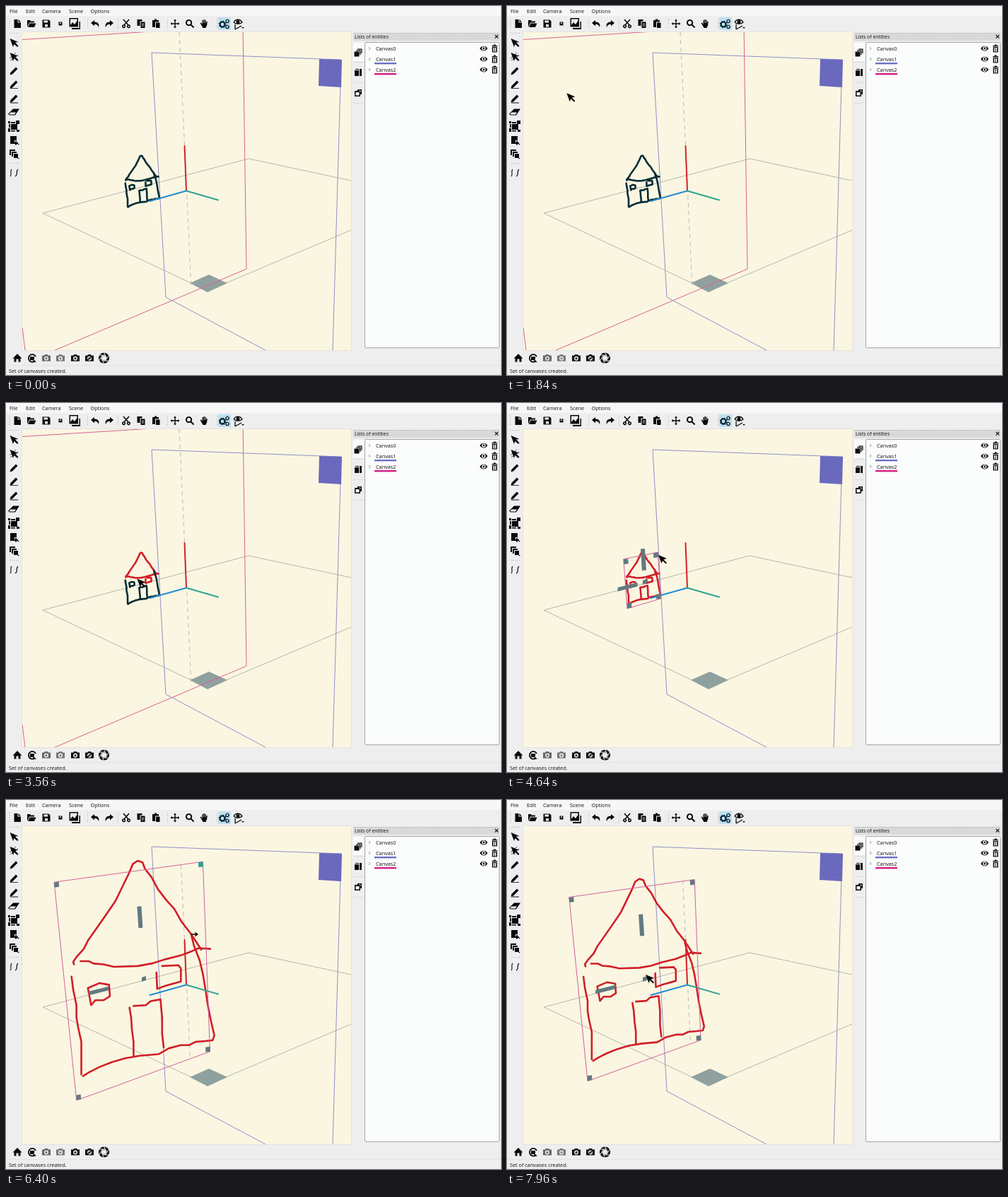
These frames come from a looping animation (700 by 522 pixels, 8000 ms). An HTML page:

```html
<!DOCTYPE html>
<html lang="en">
<head>
<meta charset="utf-8">
<title>Canvas scaling</title>
<style>
html, body { margin: 0; width: 100%; height: 100%; overflow: hidden; background: #eee; }
svg { display: block; width: 700px; height: 522px; }
text { font: 7.3px "Open Sans", "Noto Sans", sans-serif; fill: #111; }
.line { fill: none; stroke-width: 1; }
.pink { stroke: #dc6090; }
.violet { stroke: #8f90c8; }
.grey { stroke: #b5b6ae; }
.axis { stroke-width: 2; stroke-linecap: round; }
#house path { fill: none; stroke-width: 2.6; stroke-linejoin: round; stroke-linecap: round; vector-effect: non-scaling-stroke; }
#gizmo path { fill: #617a80; }
</style>
</head>
<body>
<svg viewBox="0 0 700 522">
  <defs>
    <clipPath id="view"><rect x="23" y="37" width="465" height="450"/></clipPath>
    <clipPath id="inner"><polygon id="hole"/></clipPath>
  </defs>
  <rect width="700" height="522" fill="#eee"/>
  <rect y="0" width="700" height="14" fill="#f7f7f7"/>
  <rect x="22.5" y="36.5" width="466" height="451" fill="#faf6e1" stroke="#e4e3dc"/>

  <g clip-path="url(#view)">
    <path class="line grey" d="M488 247L343 216L52 293L285 403L488 317"/>
    <path d="M260 392L287 380L313 392L285 405Z" fill="#8fa19e"/>
    <g clip-path="url(#inner)"><path class="line" stroke="#bbb9bf" stroke-dasharray="6 5" d="M245 37L262 400"/></g>
    <g id="sheet" class="line pink"><path d="M23 47.5L335 28L340 372L69 487M23 455L27 487"/></g>
    <path class="line violet" d="M367 487L226 412L206 66L474 76L462 487"/>
    <path d="M443 75L475 76L474 115L442 113Z" fill="#6a69bd"/>
    <g id="house"></g>
    <path class="axis" stroke="#d3222b" d="M255 261.500L252.500 198"/>
    <path class="axis" stroke="#268bd2" d="M255 261.500L203.500 276"/>
    <path class="axis" stroke="#2fa592" d="M255 261.500L300 274.500"/>
    <g id="gizmo"></g>
  </g>

  <g id="menu"></g>
  <rect x="300" y="16" width="18" height="18" fill="#bfe0ee"/>
  <rect id="hover" x="1.500" y="42.500" width="20" height="18" fill="#cbe6f1"/>
  <path d="M5 18V33M115.500 18V33M228.500 18V33M298.500 18V33M5 38.500H19M5 222.500H19" stroke="#aaa" stroke-dasharray="1 2"/>
  <path d="M158.500 18V33" stroke="#d6d6d6"/>

  <rect x="491" y="38" width="207" height="11" fill="#d9d9d9"/>
  <path d="M491 38.500H698" stroke="#bbb" stroke-dasharray="2 1"/>
  <text x="493" y="46" style="font-size:6.900px">Lists of entities</text>
  <path d="M691.500 41L696 45.500M696 41L691.500 45.500" stroke="#222" stroke-width="1.200"/>
  <rect x="507.500" y="51.500" width="190" height="432" rx="1" fill="#fbfdfc" stroke="#a5a5a5"/>
  <rect x="491" y="52" width="16" height="26" fill="#fafafa"/>
  <path d="M491 79.500H506M491 108.500H506M491 137.500H506" stroke="#dcdcdc"/>
  <g id="rows"></g>
  <g id="icons"></g>
  <path d="M0 508.500H700" stroke="#e2e2e2"/>
  <text x="4" y="518.500">Set of canvases created.</text>

  <g id="sys"><path d="M0 0V12L3 9.500L5 14L7 13L5 8.800H9Z" fill="#fff" stroke="#111" stroke-width=".9"/></g>
  <g id="pick"><path d="M0 0L12 5L7.500 6.500L12 11L10.500 12.500L6 8L4.500 12Z" fill="#050505"/></g>
  <g id="drag"><path d="M-5 0H3" stroke="#111" stroke-width="1.600"/><path d="M1.500-3.500L6 0L1.500 3.500Z" fill="#111"/></g>
</svg>
<script>
const $ = id => document.getElementById(id);

function add(parent, tag, attrs, text) {
  const el = document.createElementNS('http://www.w3.org/2000/svg', tag);
  for (const a in attrs) el.setAttribute(a, attrs[a]);
  if (text) el.textContent = text;
  return parent.appendChild(el);
}

// Icons: f = filled path, s = stroked path, w = stroke width
const CAMERA = 'M-6-3.5H-3L-2-5H2L3-3.5H6V4.500H-6ZM0-2.500A3 3 0 1 0 0 3.500A3 3 0 1 0 0-2.500ZM0-1A1.500 1.500 0 1 1 0 2A1.500 1.500 0 1 1 0-1Z';
const POINTER = 'M-5.500-6L6.500-1L2-.5L6.500 4.500L5 6L.5 2L-1 6Z';
const UNDO = 'M-6-1L-1-5V-2.500C4-2.500 6.500 1 5 5C4 2 2 .8-1 .8V3.500Z';
const PEN = 'M-5.500 5.500L-4.500 2L3-5.500L5.500-3L-2 4.500Z';
const EYE = 'M-5.500 0C-3-4.500 3-4.500 5.500 0C3 4.500-3 4.500-5.500 0ZM0-2.700A2.700 2.700 0 1 0 0 2.700A2.700 2.700 0 1 0 0-2.700ZM0-1.400A1.400 1.400 0 1 1 0 1.400A1.400 1.400 0 1 1 0-1.400Z';
const TRASH = 'M-4-4H-1.500V-5.500H1.500V-4H4V-2.800H-4ZM-3.500-2H3.500V5.500H-3.500ZM-2-1V4.500H-1V-1ZM-.5-1V4.500H.5V-1ZM1-1V4.500H2V-1Z';
const LAYERS = 'M-5.500-1.500H1.500V5.500H-5.500ZM-3-3.500H3.500V3H2.200V-2.300H-3ZM-1-5.500H5.500V1H4.300V-4.300H-1Z';

function icon(x, y, { f, s, w = 1.4, c = '#0a0a0a', flip }) {
  const g = add($('icons'), 'g', { transform: `translate(${x} ${y})${flip ? ' scale(-1 1)' : ''}` });
  if (f) add(g, 'path', { d: f, fill: c, 'fill-rule': 'evenodd' });
  if (s) add(g, 'path', { d: s, fill: 'none', stroke: c, 'stroke-width': w });
}

const top_ = [
  [16, { f: 'M-4.500-6H.5V-1.500H5V6H-4.500ZM1.500-6L5-2.500H1.500Z' }],
  [36, { f: 'M-6-5H-2L-1-3.500H4V-1.500H-3L-5.500 4H-6ZM-2.500-.5H6.500L4 5H-5Z' }],
  [57, { f: 'M-5.500-5.500H3.500L5.500-3.500V5.500H-5.500ZM-3.500-4.500H2V-1.500H-3.500ZM-2 1H2V4.500H-2Z' }],
  [77, { f: 'M-2.500-2.500H2.500V2.500H-2.500ZM-1-1.500V0H1V-1.500Z' }],
  [97, { f: 'M-7.500-8H5V4.500H-7.500ZM-6-6.500V3H3.500V-6.500ZM-6 2L-3-2L0 1L3.500-4V3H-6ZM6.500-3H8V8H-4V6H6.500Z' }],
  [126, { f: UNDO }],
  [146, { f: UNDO, flip: 1 }],
  [170, { s: 'M-4-6L3 2M4-6L-3 2M-3.500 2A1.800 1.800 0 1 0-3.400 2M3.500 2A1.800 1.800 0 1 1 3.400 2', w: 1.6 }],
  [191, { f: 'M-5.500-6H1.500V-3.500H-1.500V3H-5.500ZM-.5-2.500H5.500V6H-.5ZM1 0H4V1H1ZM1 2.500H4V3.500H1Z' }],
  [212, { f: 'M-5-5H-2V-6.500H1V-5H4V-2.500H-1V5H-5ZM0-1.500H5.500V6H0Z' }],
  [239, { f: 'M0-6.500L2-4H-2ZM0 6.500L2 4H-2ZM-6.500 0L-4-2V2ZM6.500 0L4-2V2Z', s: 'M0-5V5M-5 0H5' }],
  [260, { s: 'M-1.500-5A3.600 3.600 0 1 0-1.400-5M1.500 1.500L5.500 5.500', w: 2 }],
  [280, { f: 'M-5.500-1L-4-1.500L-2.500 1V-5H-1.200V-1H-.6V-6H.8V-1H1.400V-5.200H2.700V0L3.400-3H4.700L4.200 2L2.500 6H-1.500Z' }],
  [329, { s: 'M-7-2C-4-7 2-7 5-2C2 1-4 1-7-2M-5 1V8M-5 8L4 3', w: 1.3, f: 'M-1-5A2.500 2.500 0 1 0-1 0A2.500 2.500 0 1 0-1-5ZM4 5H8L6 7Z' }]
];
top_.forEach(([x, i]) => icon(x, 25, i));

// Gear pair: dashed rings give the teeth
for (const [x, y, r] of [[306, 26, 3.4], [313, 21.5, 2], [313, 29.5, 2]]) {
  add($('icons'), 'circle', { cx: x, cy: y, r, fill: 'none', stroke: '#0a2230', 'stroke-width': r * .6 });
  add($('icons'), 'circle', { cx: x, cy: y, r: r * 1.35, fill: 'none', stroke: '#0a2230', 'stroke-width': r * .4, 'stroke-dasharray': r * .53 });
}

const left = [
  [52, { f: POINTER }],
  [72, { f: POINTER, s: 'M-6 2L3-6M-5 5L6-3', w: .7 }],
  [92, { f: PEN }],
  [111, { f: PEN, s: 'M-5 5.500H6', w: .8 }],
  [131, { f: PEN, s: 'M-5 6H6', w: 1 }],
  [150, { f: 'M-8 2.500L-1-4.500H8L2 4.500H-6ZM-6.500 2.500L-5.500 3.500H1L3 .5H-4.500Z' }],
  [170, { f: 'M-8-7H-5V-4H-8ZM-4-6H2V-4H-4ZM3-8H8V-3H3ZM-7-3H-5V2H-7ZM-4-3H5V5H-4ZM-8 3H-5V8H-8ZM4 5H8V8H4ZM-4 6H2V7.500H-4Z' }],
  [190, { f: 'M-5-6H4V0H1V5H-5ZM2 1H4V3H6V5H4V6.500H2V5H1V3H2Z' }],
  [209, { f: 'M-6-6H2V-4H-4V2H-6ZM-3-3H4V-1H-1V4H-3ZM0 0H6V6H0Z' }],
  [236, { s: 'M-5 5C-2 2-6-2-3-5M2 5C7 2 2-2 6-5', w: 1.1 }]
];
left.forEach(([y, i]) => icon(11, y, i));
for (const y of [192, 212]) icon(17.5, y + 3, { f: 'M-1.500 0H1.500L0 1.500Z' });

icon(16, 498, { f: 'M-6.500 .5L0-6L6.500 .5H4.500V5.500H1.500V1.500H-1.500V5.500H-4.500V.5Z' });
icon(37, 498, { s: 'M4 4A5.300 5.300 0 1 1 5-2', w: 1.8, f: 'M-3-2H3V3H-3ZM2 2L6 6L1 5Z' });
for (const [x, c] of [[57, '#666'], [77, '#777'], [98, '#0a0a0a'], [118, '#0a0a0a']]) icon(x, 498, { f: CAMERA, c });
icon(118, 498, { s: 'M-3 3L3-2', w: 1.5 });
icon(138.5, 498, { s: 'M0-5.500A5.500 5.500 0 1 0 .1-5.500', w: 4 });
icon(138.5, 498, { s: 'M0-8L4 0M7-4L2 4M7 4H-2M0 8L-4 0M-7 4L-2-4M-7-4H2', w: 1, c: '#eee' });

icon(498, 66, { f: LAYERS });
icon(498, 94, { f: 'M-5-3H1V5H-5ZM2-5H5V5H2ZM-4-5H1V-4H-4Z' });
icon(498, 123, { f: 'M-5-3H-1V-5H5V2H3V5H-5ZM-3.500-1V3.500H1.500V-1ZM1-3.500L3.500-3.500V-1Z' });

[['File', 5], ['Edit', 28], ['Camera', 51], ['Scene', 89], ['Options', 119.5]]
  .forEach(([label, x]) => add($('menu'), 'text', { x, y: 9.8 }, label));

[null, '#6c71c4', '#d31f86'].forEach((color, i) => {
  const y = 60 + 15 * i;
  add($('rows'), 'path', { d: `M513 ${y - 2}l2 2l-2 2`, fill: 'none', stroke: '#999' });
  add($('rows'), 'text', { x: 523, y: y + 2.7 }, 'Canvas' + i);
  if (color) add($('rows'), 'rect', { x: 521, y: y + 5, width: 31, height: 2.4, fill: color });
  icon(675.5, y, { f: EYE });
  icon(691, y, { f: TRASH });
});

// House strokes, each with the time it gets selected
const strokes = [
  [2680, 'M109 235L108 232L112 226L121 216L126 206L147 176L160 157L176 124L181 112L187 108L193 110L196 118L204 128L212 143L222 156L232 167L241 183L252 197L265 217'],
  [3000, 'M117 231H127L133 234L145 235L158 238L187 237L204 234L220 229L240 224L253 219L262 215L276 216'],
  [3400, 'M217 237L237 236L240 240V256L222 261L211 265L210 245'],
  [3640, 'M126 264L140 258L152 260L153 274L145 279H135L130 285L126 264'],
  [3760, 'M106 250L108 266L112 285V300L114 312L118 330L118 370'],
  [3840, 'M253 200L256 212L263 230L267 247L270 265L273 285L277 305L281 322L279 328L270 329L258 330L250 334H240L225 338L213 345L190 347L172 350L155 355L140 361L128 367L120 372'],
  [3940, 'M177 288L179 300L180 315L182 330V347M182 286L197 285L203 280L215 278L217 300V320L219 337']
].map(([on, d]) => ({ on, el: add($('house'), 'path', { d }) }));

// Corners at full size: handle centre, drift while shrinking, outline offset
const corners = [
  [88.5, 138, 110, 119, -3.5, -3.5],
  [264, 113, -74, 141, 3, -4],
  [273, 339, -81, -90, 3, 3],
  [115, 397, 80, -152.5, -3, 4.5]
];
const frame = add($('gizmo'), 'polygon', { fill: 'none', stroke: '#d45f9c' });
const part = d => add($('gizmo'), 'path', { d });
const grips = corners.map(() => part('M-3.500-3L3-4L3.500 3L-3 4Z'));
const barV = part('M-4-15L2-15.500L4 15L-2 15.500Z');
const barH = part('M-14 1.500L14-5.500V0L-14 7Z');
part('M192-253').setAttribute('d', 'M192 251L198 249V255L192 257Z');

const path = [
  [0, -14, 100], [450, -14, 100], [880, 11, 57], [1400, 11, 57], [2400, 189, 218], [2640, 189, 218],
  [3000, 203, 238], [3440, 200, 246], [3650, 176, 250], [3780, 171, 262], [3900, 178, 276], [4060, 204, 262],
  [4240, 204, 262], [4600, 214, 215], [4800, 214, 215], [5040, 210, 214], [5320, 210, 214], [5760, 257, 192],
  [6040, 266, 190], [6360, 266, 190], [6960, 262, 192], [7120, 261, 192], [7240, 261, 192], [7800, 196, 247], [8000, 196, 247]
];
const sizes = [[0, .275], [5320, .275], [5760, .77], [6040, 1.165], [6360, 1.165], [6960, 1], [7120, .975], [8000, .975]];

const smooth = u => u * u * (3 - 2 * u);
function at(keys, t, ease = u => u) {
  let i = 1;
  while (i < keys.length - 1 && keys[i][0] <= t) i++;
  const a = keys[i - 1], b = keys[i];
  const u = ease((t - a[0]) / (b[0] - a[0]));
  return a.slice(1).map((v, j) => v + (b[j + 1] - v) * u);
}
const show = (el, on) => el.style.display = on ? '' : 'none';
const move = (el, x, y) => el.setAttribute('transform', `translate(${x} ${y})`);

function draw(t) {
  const [k] = at(sizes, t), q = 1 - k;
  const boxed = t >= 4240, scaling = t >= 5000 && t < 7240;

  $('house').setAttribute('transform', `translate(${192.5 * q} ${251 * q}) scale(${k})`);
  for (const s of strokes) s.el.setAttribute('stroke', t >= s.on ? '#d11e28' : '#062c36');

  const outline = corners.map(([x, y, dx, dy, ox, oy], i) => {
    const px = x + dx * q, py = y + dy * q;
    move(grips[i], px, py);
    return [px + ox, py + oy];
  }).join(' ');
  frame.setAttribute('points', outline);
  grips[1].style.fill = scaling ? '#2aa590' : '';
  move(barV, 190 + 4 * q, 175.5 + 63.5 * q);
  move(barH, 138 + 45 * q, 267.5 - 11 * q);
  show($('gizmo'), boxed);
  show($('sheet'), !boxed);
  $('hole').setAttribute('points', boxed ? outline : '23 37 488 37 488 487 23 487');

  const [x, y] = at(path, t, t > 5320 && t < 6040 ? undefined : smooth);
  const sys = x < 23;
  for (const id of ['sys', 'pick', 'drag']) move($(id), x, y);
  show($('sys'), sys);
  show($('drag'), scaling);
  show($('pick'), !sys && !scaling);
  show($('hover'), sys && x > 1 && y > 42 && y < 61);
}

const start = performance.now();
function tick() {
  draw((performance.now() - start) % 8000);
  requestAnimationFrame(tick);
}
draw(0);
requestAnimationFrame(tick);
</script>
</body>
</html>
```
